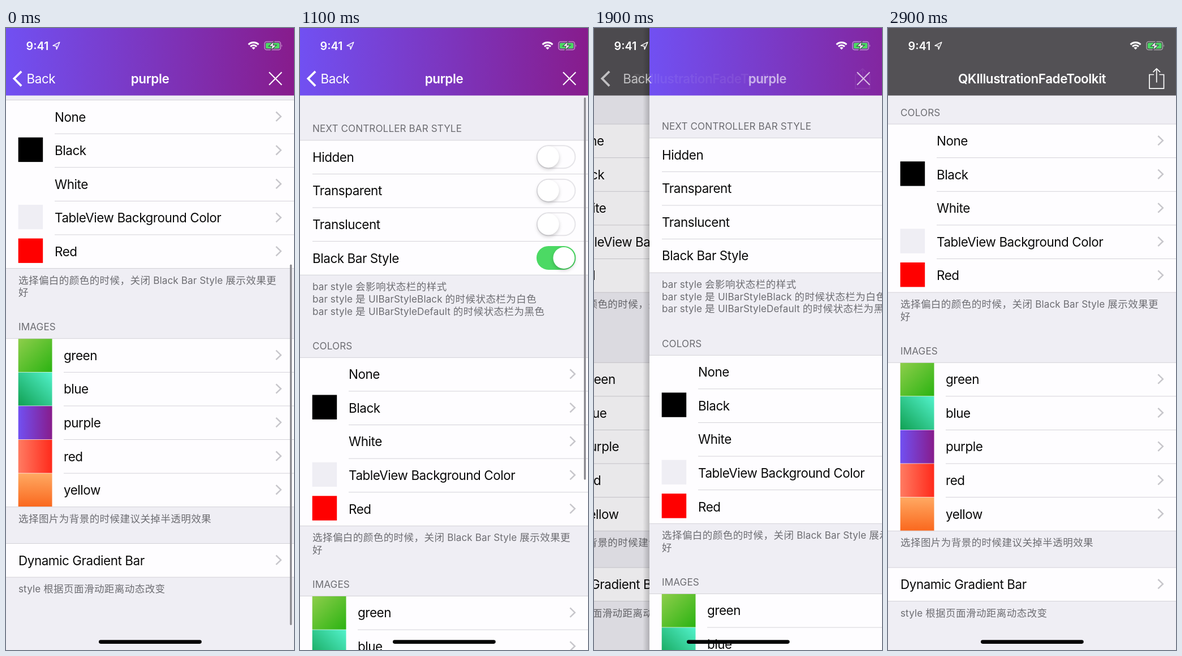
Recreate the animation shown at these times as an HTML page. Size 509 by 1101 pixels, loop 3 s.

```html
<!DOCTYPE html>
<html lang="en">
<head>
<meta charset="utf-8">
<title>Bar transition</title>
<style>
  html, body { margin: 0; width: 100%; height: 100%; overflow: hidden; background: #efeef4; }
  svg { display: block; width: 100%; height: 100%; }
  text { font-family: Inter, "Noto Sans CJK SC", "Noto Sans CJK", sans-serif; white-space: pre; }
  .label { font-size: 22.4px; letter-spacing: -.42px; fill: #0a0a0a; }
  .note { font-size: 17.1px; letter-spacing: .1px; fill: #6d6d72; }
  .han { font-size: 17.5px; letter-spacing: .45px; font-family: "Noto Sans CJK SC", "Noto Sans CJK", sans-serif; }
  .bar { font-size: 22.4px; letter-spacing: -.4px; fill: #fff; }
  .title { font-weight: 600; text-anchor: middle; }
  .line { fill: none; stroke: #fff; }
  .knob { fill: #fff; filter: drop-shadow(0 3px 3px rgba(0,0,0,.2)); }
</style>
</head>
<body>
<svg viewBox="0 0 509 1101" preserveAspectRatio="none">
  <defs id="defs">
    <linearGradient id="edge"><stop stop-opacity="0"/><stop offset="1" stop-opacity=".2"/></linearGradient>
    <g id="table"></g>
  </defs>

  <g id="root">
    <rect width="509" height="1101" fill="#efeef4"/>
    <use href="#table" y="170"/>
    <rect width="509" height="119.5" fill="#535155"/>
  </g>
  <rect id="dim" width="509" height="1101"/>

  <g id="page">
    <rect x="-12" width="12" height="1101" fill="url(#edge)"/>
    <rect width="509" height="1101" fill="#efeef4"/>
    <use id="list" href="#table"/>
    <rect id="thumb" x="501.8" width="3.4" rx="1.7" fill="#8b8a90"/>
    <rect width="509" height="119.5" fill="url(#purple)"/>
  </g>

  <text id="rootTitle" class="bar title" y="97.5">QKIllustrationFadeToolkit</text>
  <g id="share" class="line" stroke-width="1.7">
    <path d="M470 82.5H462V107.2H487.5V82.5H479.5M474.7 96.5V72M468.5 78.2L474.7 72L481 78.2"/>
  </g>
  <path id="arrow" class="line" stroke-width="3.8" d="M27.2 76.8L14.3 89.6L27.2 102.6"/>
  <text id="back" class="bar" y="97.5">Back</text>
  <text id="pageTitle" class="bar title" y="97.5">purple</text>
  <path id="close" class="line" stroke-width="2.1" d="M465 78.3L487.3 100.8M487.3 78.3L465 100.8"/>

  <text x="35.5" y="38.5" class="bar" style="font-size:19.8px;font-weight:600;letter-spacing:0">9:41</text>
  <path class="line" stroke-width="1.5" stroke-linejoin="round" d="M94.8 25.2L83 31.2L88.7 32L89.4 37.8Z"/>
  <g class="line" stroke-width="3.1">
    <path d="M428.6 29.3A12.6 12.6 0 0 1 446.4 29.3"/>
    <path d="M432 32.8A7.8 7.8 0 0 1 443 32.8"/>
    <path d="M437.5 38.2L434.4 35A4.4 4.4 0 0 1 440.6 35Z" fill="#fff" stroke="none"/>
  </g>
  <rect x="457" y="24.2" width="28.4" height="14.4" rx="3.6" class="line" stroke-width="1.3" opacity=".55"/>
  <path d="M487 29.2Q489 31.4 487 33.6Z" fill="#fff" opacity=".55"/>
  <rect x="459" y="26.2" width="24.4" height="10.4" rx="2" fill="#4cd964"/>
  <path d="M473.8 23.6L464.4 32.4H470.2L468.2 39.4L478 30.4H472Z" fill="#fff" stroke="#4a4656" stroke-width="1.2"/>
  <rect x="164" y="1083.3" width="181.7" height="6.6" rx="3.3" fill="#050505"/>
</svg>

<script>
const $ = id => document.getElementById(id);
const ROW = 59.6;
const LOOP = 3000, STEP = 100;
const TOP_REST = 579, BOTTOM_REST = 170;

// name, direction (x1 y1 x2 y2), start and end colour
const gradients = [
  ["green", [0, 0, 1, 1], "#8ece4b", "#2bb312"],
  ["blue", [0, 1, 1, 0], "#10a052", "#52f2cb"],
  ["purple", [0, 0, 1, 0], "#7150f2", "#871c8c"],
  ["red", [0, 0, 1, 0], "#ff7b62", "#ff2a1b"],
  ["yellow", [0, 0, 0, 1], "#ffa962", "#fa681e"],
];
const colors = [["None"], ["Black", "#000"], ["White"], ["TableView Background Color", "#efeef4"], ["Red", "#f00"]];
const switches = ["Hidden", "Transparent", "Translucent", "Black Bar Style"];

const rect = (x, y, w, h, fill) => `<rect x="${x}" y="${y}" width="${w}" height="${h}" fill="${fill}"/>`;
const rule = (x, y) => rect(x, y - .4, 509 - x, .9, "#cfced4");
const label = (x, y, s) => `<text class="label" x="${x}" y="${y + 38}">${s}</text>`;
const heading = (y, s) => `<text class="note" x="22" y="${y - 14.3}">${s}</text>`;
const chevron = y =>
  `<path d="M477.3 ${y + 21}L485.8 ${y + 29.2}L477.3 ${y + 37.4}" fill="none" stroke="#c7c6cb" stroke-width="2.5"/>`;

function notes(y, ...lines) {
  return lines.map((s, i) => {
    const runs = s.replace(/[\u3000-\uffef]+/g, '<tspan class="han">$&</tspan>');
    return `<text class="note" x="22" y="${y + 27 + i * 21.7}">${runs}</text>`;
  }).join("");
}

function toggle(y, on) {
  return `<rect x="419" y="${y + 9.4}" width="67.4" height="40" rx="20" stroke-width="2"
    fill="${on ? "#4cd964" : "#fefdff"}" stroke="${on ? "#4cd964" : "#e5e4e8"}"/>
    <circle class="knob" cx="${on ? 466.4 : 438.8}" cy="${y + 29.4}" r="19"/>`;
}

function section(y, items, inset, draw) {
  const h = items.length * ROW;
  return rect(0, y, 509, h, "#fefdff")
    + items.map((item, i) => (i ? rule(inset, y + i * ROW) : "") + draw(item, y + i * ROW)).join("")
    + rule(0, y) + rule(0, y + h);
}

$("defs").insertAdjacentHTML("beforeend", gradients.map(([id, [x1, y1, x2, y2], a, b]) =>
  `<linearGradient id="${id}" x1="${x1}" y1="${y1}" x2="${x2}" y2="${y2}">
    <stop stop-color="${a}"/><stop offset="1" stop-color="${b}"/></linearGradient>`).join(""));

// The table's zero line is the top of the COLORS rows.
$("table").innerHTML =
  heading(-384.5, "NEXT CONTROLLER BAR STYLE")
  + section(-384.5, switches, 22, (s, y) => label(22, y, s) + toggle(y, s === "Black Bar Style"))
  + notes(-146.1, "bar style 会影响状态栏的样式", "bar style 是 UIBarStyleBlack 的时候状态栏为白色",
    "bar style 是 UIBarStyleDefault 的时候状态栏为黑色")
  + heading(0, "COLORS")
  + section(0, colors, 86, ([s, fill], y) =>
    (fill ? rect(21.7, y + 6.6, 43.5, 43.4, fill) : "") + label(86, y, s) + chevron(y))
  + notes(298, "选择偏白的颜色的时候，关闭 Black Bar Style 展示效果更", "好")
  + heading(422.2, "IMAGES")
  + section(422.2, gradients, 102, ([s], y) =>
    rect(21.7, y + .3, 59.8, 58.9, `url(#${s})`) + label(102, y, s) + chevron(y))
  + notes(720.2, "选择图片为背景的时候建议关掉半透明效果")
  + section(785, ["Dynamic Gradient Bar"], 22, (s, y) => label(22, y, s) + chevron(y))
  + notes(844.6, "style 根据页面滑动距离动态改变");

const clamp = v => Math.min(1, Math.max(0, v));

// Bottom bounce, flick to the top, top bounce.
function listY(t) {
  if (t <= 300) return BOTTOM_REST - 42.5 * Math.exp(-t / 153);
  if (t < 700) {
    const u = (t - 300) / 400;
    return 164 + 435.5 * u * u * (3 - 2 * u);
  }
  return TOP_REST + 20.5 * Math.exp(-(t - 700) / 255);
}

// Slow finger drag, then release.
function pageX(t) {
  const drag = Math.max(0, .196 * (t - 1400));
  if (t < 2350) return drag;
  return 509 - 323 * (1 - clamp((t - 2350) / 500)) ** 2.5;
}

const move = (id, x, y = 0) => $(id).setAttribute("transform", `translate(${x} ${y})`);
const fade = (id, v) => $(id).setAttribute("opacity", clamp(v));

function render(t) {
  const y = listY(t), x = pageX(t), p = x / 509;
  move("list", 0, y);
  move("page", x);
  move("root", -152.7 * (1 - p));
  fade("dim", .1 * (1 - p));
  $("page").style.display = p < 1 ? "" : "none";

  const over = Math.max(0, y - TOP_REST, BOTTOM_REST - y);
  const length = 681 - over;
  const travel = clamp((TOP_REST - y) / (TOP_REST - BOTTOM_REST));
  $("thumb").setAttribute("y", 123 + (934 - length) * travel);
  $("thumb").setAttribute("height", length);
  fade("thumb", (1400 - t) / 200);

  $("back").setAttribute("x", 36.5 + .15 * x);
  $("pageTitle").setAttribute("x", 254.5 + .53 * x);
  $("rootTitle").setAttribute("x", 254.5 - 70 * (1 - p));
  fade("back", 1 - 1.8 * p);
  fade("arrow", 1 - 1.8 * p);
  fade("pageTitle", 1 - 2.1 * p);
  fade("close", 1 - 1.6 * p);
  fade("rootTitle", p ** 1.6);
  fade("share", p ** 1.6);
}

const start = performance.now();
function tick() {
  const t = (performance.now() - start) % LOOP;
  render(Math.floor(t / STEP) * STEP);
  requestAnimationFrame(tick);
}
tick();
</script>
</body>
</html>
```
